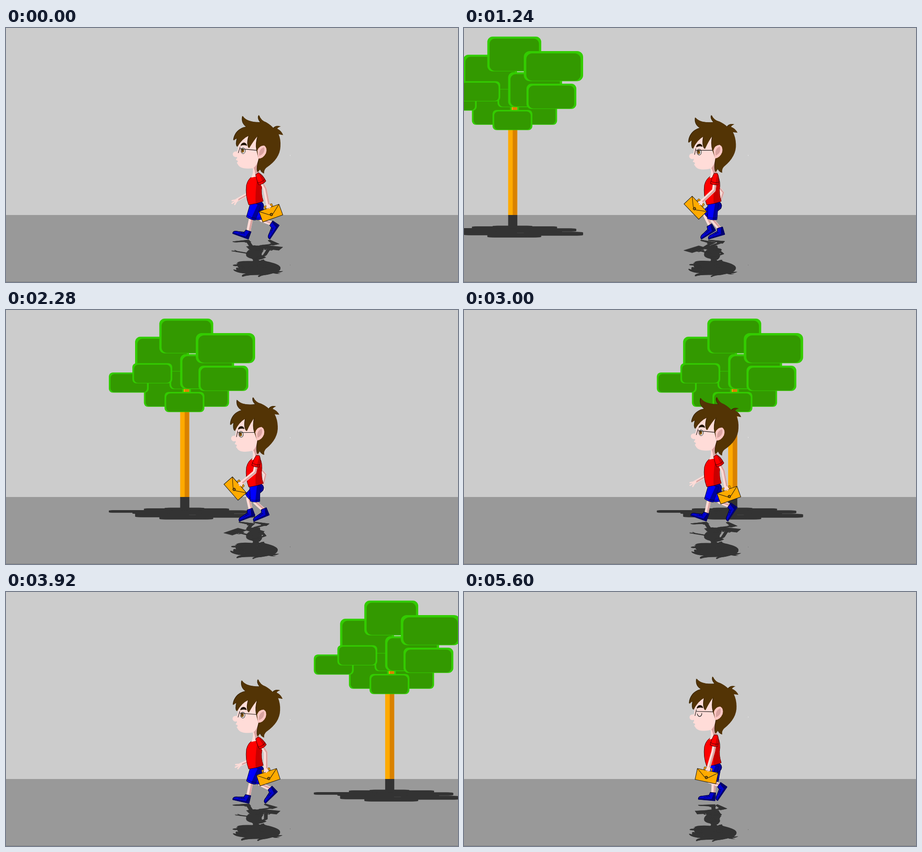
An HTML page with a canvas that plays this animation: 998x561 px, repeating every 5640 ms.

```html
<!DOCTYPE html>
<html lang="en">
<head>
<meta charset="utf-8">
<title>Walking boy</title>
<style>
html, body { margin: 0; width: 100%; height: 100%; overflow: hidden; background: #ccc; }
canvas { display: block; }
</style>
</head>
<body>
<canvas id="stage" width="998" height="561"></canvas>
<script>
const ctx = document.getElementById('stage').getContext('2d');
const LOOP = 5640, STEP = 40, CYCLE = 25;
const SKIN = '#ffdcd8', SKIN_DARK = '#d9a3a0', HAIR = '#533405', DARK = '#332000';
const RED = '#f00', BLUE = '#00f', NAVY = '#00009a', GOLD = '#fa0', BLACK = '#111';
let shade = null; // when set, everything is painted in this one colour

const rad = deg => deg * Math.PI / 180;
const smooth = q => q * q * (3 - 2 * q);
const downTo = (a, b) => Math.atan2(a[0] - b[0], b[1] - a[1]);

// The body rises twice per cycle, as one leg passes the other
const bobAt = p => -6 * Math.max(0, Math.cos(4 * Math.PI * (p - .12)));

// Arm swing, 0 at the back and 1 at the front: quick forward, slow back
const swingAt = p => p < .4
  ? Math.sin(Math.PI / 2 * p / .4) ** .8
  : (1 - (p - .4) / .6) ** 1.25;

// Ankle position and tilt: roll from heel to toe, then swing forward.
// The lowest corner of the sole stays on the ground.
function footAt(phase, bob) {
  const p = phase % 1, planted = p < .5;
  const x = planted
    ? 534 + 58 * Math.min(1, p / .45) ** .85
    : 534 + 58 * Math.max(0, 1 - (p - .5) / .4) ** 1.7;
  const tilt = rad(planted ? 20 - 152 * p : -56 + 76 * smooth(Math.max(0, (p - .58) / .42)));
  const sin = Math.sin(tilt), cos = Math.cos(tilt);
  return [x, 466.5 + bob - 10 * cos - Math.max(5 * sin, -32 * sin), tilt];
}

// Middle joint of a two-bone limb; side is -1 for left, 1 for right
function joint(a, b, l1, l2, side) {
  const dx = b[0] - a[0], dy = b[1] - a[1];
  const d = Math.min(Math.hypot(dx, dy), l1 + l2 - .1);
  const bend = Math.acos((l1 * l1 + d * d - l2 * l2) / (2 * l1 * d));
  const dir = Math.atan2(dy, dx) - side * bend;
  return [a[0] + l1 * Math.cos(dir), a[1] + l1 * Math.sin(dir)];
}

function paint(path, fill, line, width = 1) {
  const p = typeof path === 'string' ? new Path2D(path) : path;
  if (fill) { ctx.fillStyle = shade || fill; ctx.fill(p); }
  if (line) { ctx.strokeStyle = shade || line; ctx.lineWidth = width; ctx.stroke(p); }
}

function oval(x, y, rx, ry, fill, line) {
  const p = new Path2D();
  p.ellipse(x, y, rx, ry, 0, 0, 7);
  paint(p, fill, line);
}

function placed(x, y, angle, draw) {
  ctx.save();
  ctx.translate(x, y);
  ctx.rotate(angle);
  draw();
  ctx.restore();
}

function limb(points, width) {
  const d = shift => 'M' + points.map(([x, y]) => `${x + shift} ${y}`).join('L');
  paint(d(0), null, SKIN, width);
  paint(d(width * .27), null, SKIN_DARK, width * .42);
}

function leg(hip, [x, y, tilt]) {
  const ankle = [x, y], knee = joint(hip, ankle, 31, 30, -1);
  limb([knee, ankle], 9);
  placed(x, y, tilt, () => {
    paint('M-7-7L5-7 5 10-32 10Q-33 3-22 2L-9-1Z', '#0000d0', '#000040', 1.3);
    paint('M-32 8L5 7V11H-32ZM1-6L5-7 5 8-3 8Z', '#000070');
    paint('M-20 5L-8 2M-15 1L-12 4M-10 0L-7 3', null, '#000050', .8);
  });
  placed(...hip, downTo(hip, knee), () => {
    paint('M-12-6L11-6 10 29Q0 32-11 28Z', BLUE, '#000030');
    paint('M4-6H11L10 29 0 30Z', NAVY);
    paint('M-10 25Q0 28 10 25', null, '#000030', .8);
  });
}

function briefcase() {
  paint('M-8 5V-1H8V5', null, '#553300', 3.5);
  paint('M-8 5V-1H8V5', null, GOLD, 1.8);
  paint('M-23.5 4.5H23.5V29.5H-23.5Z', GOLD, BLACK);
  paint('M-23 5L-5 19Q0 22 5 19L23 5', null, BLACK);
  oval(0, 20, 2.8, 2.8, '#9a6500', BLACK);
}

function head(closed) {
  paint('M544 306Q548 320 541 331L556 328 558 298Z', SKIN);
  paint('M556 286Q554 303 546 307Q551 318 550 328L558 323 558 300Z', SKIN_DARK);
  paint('M557 236L518 240C514 254 513 264 511 273C503 272 500 276 501 281C503 286 508 286 510 285Q511 288 508 290Q507 293 511 293L512 296Q508 298 511 300Q514 308 524 310Q535 312 546 310Q554 304 558 290Z', SKIN);
  const hair = 'M503 249C504 236 513 222 531 219Q519 210 523 195Q532 209 562 209Q555 200 559 193Q563 205 575 209Q585 215 591 222Q596 215 607 218Q600 220 599 223Q608 227 612 237L602 235Q607 247 606 262Q605 289 575 309Q569 314 570 322Q563 319 562 312L556 319Q553 310 559 290L554 270Q551 256 557 238Q548 247 537 266Q531 257 537 238Q521 245 511 263Q507 258 511 244Q506 246 503 249Z';
  placed(-1.3, -.5, 0, () => paint(hair, DARK));
  paint(hair, HAIR);
  paint('M555 271Q559 260 570 260Q578 265 574 277Q568 289 557 289Z', '#ffc8c4');
  paint('M559 283Q558 267 570 264Q573 278 559 283Z', SKIN_DARK);
  paint('M518.5 260Q520 254 526 254Q531 255 531.5 260Q525 257 518.5 260Z', '#221400', '#221400');
  if (closed) {
    paint('M518.5 272.5Q519 278.5 523.3 278.5Q528 278 528.3 272', null, BLACK, 1.2);
  } else {
    oval(523.5, 271.5, 4.8, 6.5, '#fff', BLACK);
    oval(522.7, 271.2, 2.5, 4.2, '#a66a12', '#5a3500');
    oval(522.3, 270.5, 1, 1.8, BLACK);
  }
  paint('M513 276L517 263M517 267L553 270.5', null, BLACK, 1.1);
}

function boy(p) {
  const bob = bobAt(p), swing = swingAt(p), late = swing ** .8;
  const hand = [579 - 66 * swing, 393 - 13 * swing ** 3];
  const farHand = [510 + 60 * late, 380 + 8 * late];
  const caseTilt = -20 + 72 * swing ** (p < .4 ? .5 : 1.6);
  const shoulder = [556, 326 + bob], farShoulder = [548, 336 + bob];
  const elbow = joint(shoulder, hand, 33, 39, 1);
  const farElbow = joint(farShoulder, farHand, 36, 25, 1);
  ctx.lineJoin = ctx.lineCap = 'round';

  limb([farShoulder, farElbow, farHand], 7);
  placed(...farHand, downTo(farElbow, farHand), () =>
    paint('M0-2L-4 10M0-2L1 13M0-2L6 9', null, SKIN, 3));
  leg([556, 394 + bob], footAt(p + .5, bob));
  placed(0, bob, 0, () => oval(554, 393, 15, 12, NAVY, '#000030'));
  leg([550, 394 + bob], footAt(p, bob));

  placed(0, bob, 0, () => {
    paint('M548 326Q535 331 531 347Q528 370 536 391Q552 389 568 383Q562 365 565 350Q566 332 556 321Z', RED, '#400');
    paint('M554 336Q550 365 551 388L567.5 383Q562 365 565 350Z', '#c80000');
    paint('M627 281H628V283H627Z', '#eee');
  });
  placed(551, 318 + bob, rad(-6.3 * late), () => {
    ctx.translate(-551, -318);
    head(p > .42 && p < .7);
  });

  placed(...hand, rad(caseTilt), briefcase);
  limb([shoulder, elbow, hand], 8);
  placed(...hand, downTo(elbow, hand), () =>
    paint('M-2-2L-3 4M0-2L1 5M2-2L4 3', null, SKIN, 3));
  placed(556, 324 + bob, downTo(shoulder, elbow), () => {
    paint('M-4-2Q-8 8-9 21Q0 25 9 21Q9 5 3-3Z', RED, '#400');
    paint('M3-2Q8 5 8.5 21L2 22Z', '#c80000');
    paint('M-9 16Q0 20 9 16', null, '#400', .9);
  });
}

// Foliage: left and top from the trunk, and width; height follows from the kind
const TALL = [[-80, 157, 88], [20, 157, 88], [-23.5, 118, 88], [-99.5, 59, 119], [0, 97.5, 119], [-46, 19, 119]];
const WIDE = [[-157.5, 138, 88], [-105.5, 117.5, 88], [34.5, 51, 131], [40.5, 123, 110], [-34.5, 181, 88]];

function block(x, y, w, h, r, color) {
  const p = new Path2D();
  p.roundRect(x, y, w, h, r);
  paint(p, color);
}

function leaves(list, ratio) {
  for (const [x, y, w] of list) {
    const h = w * ratio, edge = w * .042, round = w * .1;
    block(x, y, w, h, round, '#3c0');
    block(x + edge, y + edge * .9, w - 2 * edge, h - edge * .9 - 1, round, '#390');
  }
}

function tree() {
  paint('M0 170H20V413H0Z', GOLD);
  paint('M10 170H20V413H10Z', '#d98200');
  leaves(TALL, .645);
  leaves(WIDE, .507);
}

// Flattened mirror image of a figure below the given base line
function shadow(base, depth, draw) {
  ctx.save();
  ctx.translate(0, base);
  ctx.scale(1, -depth);
  ctx.translate(0, -base);
  shade = '#333';
  draw();
  shade = null;
  ctx.restore();
}

function frame(now) {
  const n = Math.floor(now % LOOP / STEP);
  const treeX = 97.5 + (n * STEP - 1240) * .276;
  const drawTree = () => placed(treeX, 0, 0, tree);
  const drawBoy = () => boy(n % CYCLE / CYCLE);

  ctx.fillStyle = '#ccc';
  ctx.fillRect(0, 0, 998, 413);
  ctx.fillStyle = '#999';
  ctx.fillRect(0, 413, 998, 148);
  ctx.fillStyle = '#808080';
  ctx.fillRect(0, 560, 998, 1);
  shadow(413, .1263, drawTree);
  drawTree();
  shadow(467.5, .3, drawBoy);
  drawBoy();
}

const start = performance.now();
(function tick() {
  frame(performance.now() - start);
  requestAnimationFrame(tick);
})();
</script>
</body>
</html>
```
